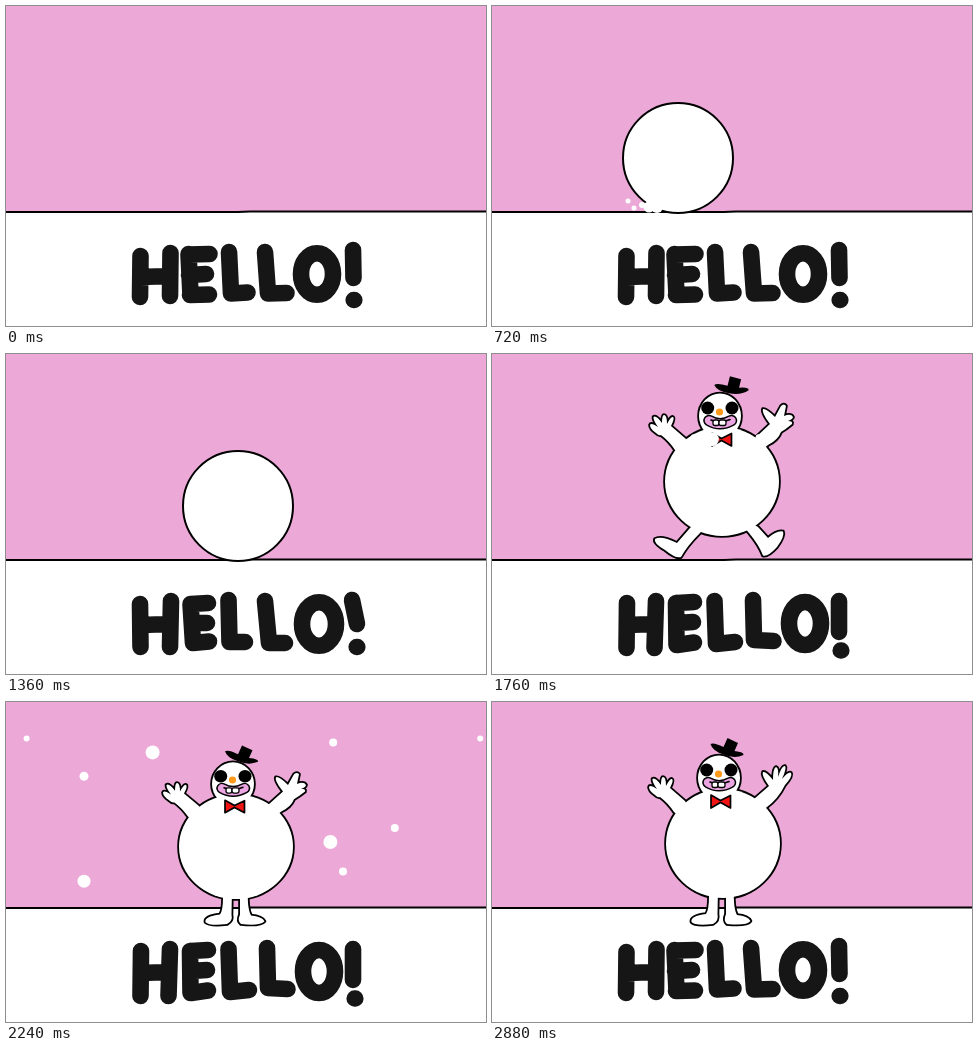
These frames come from a looping animation (480x320 px, 2.96 s). An HTML page:

```html
<!DOCTYPE html>
<html lang="en">
<head>
<meta charset="utf-8">
<title>Hello snowman</title>
<style>
  html, body { margin: 0; width: 100%; height: 100%; overflow: hidden; background: #fff; }
  svg { display: block; width: 480px; height: 320px; }
  .line { fill: none; stroke: #000; stroke-width: 2; }
  #letters { fill: none; stroke: #161616; stroke-width: 16.6; stroke-linecap: round; stroke-linejoin: round; }
</style>
</head>
<body>
<svg viewBox="0 0 480 320" role="img" aria-label="HELLO!">
  <defs>
    <g id="figure">
      <path d="M200 112L193 99L178 86Q182 78 180 77Q178 76 174 84Q174 75 171 75Q169 75 169 83Q163 75 160.5 77Q160 80 165 87Q158 82 157 85Q157 89 163 93Q166 96 168 95Q176 101 182 110L200 125Z"/>
      <path id="armRight"/>
      <path id="legLeft"/>
      <path id="legRight"/>
      <ellipse id="body" cy="141.5" rx="57" ry="54.5"/>
      <ellipse cx="227" cy="76" rx="21" ry="22.5"/>
    </g>
  </defs>
  <rect width="480" height="206" fill="#eca8d7"/>
  <path d="M0 206H232L244 205.3H480V320H0Z" fill="#fff"/>
  <path class="line" d="M0 206H232L244 205.4H480"/>
  <path id="letters"/>
  <g id="ball">
    <circle cy="152" r="55" fill="#fff" stroke="#000" stroke-width="2"/>
    <g id="spray" fill="#fff"></g>
  </g>
  <g id="snowman">
    <use href="#figure" stroke="#000" stroke-width="3.6" stroke-linejoin="round"/>
    <use href="#figure" fill="#fff"/>
    <circle cx="214.7" cy="68" r="6.5"/>
    <circle cx="239" cy="68" r="6.5"/>
    <circle cx="226.5" cy="72" r="3.6" fill="#ff9a1a"/>
    <g fill="none" stroke-linecap="round">
      <path d="M216 80.5Q227 87 238.5 80.5" stroke="#000" stroke-width="11.5"/>
      <path d="M216 80.5Q227 87 238.5 80.5" stroke="#eba6e2" stroke-width="8.5"/>
      <path d="M218 80Q227 84 237 79.5" stroke="#000" stroke-width="1.6"/>
    </g>
    <g fill="#fff" stroke="#000" stroke-width="1.3">
      <rect x="220" y="80" width="6" height="5.5" rx="2"/>
      <rect x="226" y="80" width="7" height="5.5" rx="2"/>
    </g>
    <path d="M219 93L228.5 98.5L238.5 93.5V106L228.5 100.5L219 106Z" fill="#f01414" stroke="#000" stroke-width="1.7" stroke-linejoin="round"/>
    <path id="hat" d="M219 42Q222 40 232 45L236 36L246.5 41L243 49Q253 50 252 53Q243 57 232 52.5Q221 49 219 42Z"/>
  </g>
  <g id="flakes" fill="#fff"></g>
</svg>
<script>
const STEP = 80, STEPS = 37;
const BURST = 22, LAND = 28;
const $ = id => document.getElementById(id);

// Three hand-drawn variants that alternate on every step.
const oval = (x, y, rx, ry) =>
  `M${x - rx} ${y}a${rx} ${ry} 0 1 0 ${2 * rx} 0a${rx} ${ry} 0 1 0 ${-2 * rx} 0`;
const lettering = [
  "M134.5 250L134 291M164.5 247L164 290M135 271L164 270" +
  "M182.5 248L184.5 289M183 248.5L203.5 248M183 269L200 268M184 289L203 288.5" +
  "M223 246L225 287.5L241.5 286.5M259 246L262 287.5L280.5 287" +
  oval(311, 268, 16, 20.8) + "M347 244L347.5 272M347.7 294h.6",
  "M135 249L134.5 294M164 247L162.5 294M135 271L163 270" +
  "M184 249L184.5 291M185 249L202 248M185 269L201 268M185 291L202 288.5" +
  "M222.5 247L224 290L243 288M261 246L262 286L281.5 287" +
  oval(313, 269.5, 16, 21.5) + "M347 247L347 278M348.7 296.5h.6",
  "M134 250L134.5 293M165 247L164 293M135 271L164 270" +
  "M184.5 250L187 289M185 250L202 249M186 269L201 269M187 289L203 287.5" +
  "M222.5 246L223.5 288L239 288M259 247L263 289L279 289" +
  oval(313, 270, 17, 21.8) + "M346 246L351 270M350.7 293h.6"
];
const waveOpen = "M250 110L262 97L277 84Q269 73 271 70Q274 69 281 78Q281 66 284 65Q287 66 286 75Q290 63 293 64Q295 66 290 77Q297 69 299 71Q301 74 293 83Q286 97 275 105L250 125Z";
const wavePoint = "M250 110L262 98L277 84Q268 72 270 69Q273 68 282 77L288 66Q291 63 293 66L291 76Q298 73 300 77Q300 79 295 81Q300 81 299 84Q293 89 288 92Q285 100 275 105L250 125Z";
const wave = [waveOpen, wavePoint, wavePoint];
const bodyX = [231, 230, 232];
const spray = [
  [[-50, 195, 2.5], [-44, 202, 2.5], [-36, 199, 3], [-29, 201, 5.5], [-21, 201, 6]],
  [[-52, 191, 2.5], [-45, 194, 2.5], [-48, 201, 2], [-36, 199, 5], [-28, 199, 8], [-21, 203, 4]],
  [[-51, 199, 2.5], [-46, 192, 2], [-38, 201, 4], [-28, 201, 6], [-20, 204, 3]]
];

const standing = [
  "M217 185V194Q217 208 214 212Q198 214 199.5 220Q203 224 221 222Q227 219 225.5 212L226 185Z",
  "M234 185V212Q231 219 235 222Q255 224 258.5 219Q256 214 245 213Q241 206 242 185Z"
];
const leaping = [
  "M207 178L197 188L184 203Q168 195 162 199Q160 203 172 210Q183 219 188 217Q194 206 207 193L217 180Z",
  "M250 178L265 187L275 198Q284 190 290 191.5Q292 196 284 207Q275 217 270 215.5Q266 205 256 193L245 180Z"
];

const rollKeys = [[0, -60], [1, -25], [4, 55], [9, 186], [11, 228], [12, 232]];
const jump = [-14, -38, -52, -50, -36, -14];
const hatLift = [0, -1, -2, -4, -3, -2];

// Each flake: its place five steps after the burst, and its radius.
const FLIGHT = 5, GRAVITY = 14;
const flakes = [
  [122, 23, 4.5], [171, 6, 7], [122, 98, 6.5], [174, 118, 4], [298, 70, 7], [307, 91, 4],
  [300, 126, 4], [344, 60, 4], [300, -1, 4], [81, -4, 3], [405, -4, 3]
];

const dots = list => list.map(([x, y, r]) => `<circle cx="${x}" cy="${y}" r="${r}"/>`).join("");
const show = (id, on) => $(id).setAttribute("visibility", on ? "visible" : "hidden");
const set = (id, name, value) => $(id).setAttribute(name, value);

function along(keys, t) {
  const i = keys.findIndex(k => k[0] >= t);
  if (i < 0) return keys[keys.length - 1][1];
  if (i === 0) return keys[0][1];
  const [t0, a] = keys[i - 1], [t1, b] = keys[i];
  return a + (b - a) * (t - t0) / (t1 - t0);
}

function flakeAt([x, y, r], t) {
  const vx = (x - 232) / FLIGHT;
  const vy = (y - 140) / FLIGHT - GRAVITY * FLIGHT / 2;
  return [232 + vx * t, 140 + vy * t + GRAVITY * t * t / 2, r];
}

function drawBall(step, pose) {
  const rolling = step > 0 && step < 12;
  set("ball", "transform", `translate(${along(rollKeys, step)})`);
  $("spray").innerHTML = rolling ? dots(spray[pose]) : "";
}

function drawSnowman(step, pose) {
  const airborne = step < LAND;
  const n = step - BURST;
  const dy = airborne ? jump[n] : 0;
  const squash = step === LAND ? .96 : 1;
  const [left, right] = airborne ? leaping : standing;
  set("snowman", "transform", `translate(${airborne ? 1 : 0} ${dy + 224 * (1 - squash)}) scale(1 ${squash})`);
  set("legLeft", "d", left);
  set("legRight", "d", right);
  set("armRight", "d", wave[pose]);
  set("body", "cx", bodyX[pose] - (airborne ? 1 : 0));
  set("hat", "transform", airborne ? `translate(3 ${hatLift[n]}) rotate(-10 236 48)` : `translate(${pose ? 0 : -.5} 0)`);
}

function draw(step) {
  const pose = step % 3, burst = step >= BURST;
  set("letters", "d", lettering[pose]);
  show("ball", !burst);
  show("snowman", burst);
  if (burst) drawSnowman(step, pose);
  else drawBall(step, pose);
  const flown = step - BURST + 1;
  const aloft = burst ? flakes.map(f => flakeAt(f, flown)).filter(f => f[1] < 200) : [];
  $("flakes").innerHTML = dots(aloft);
}

const start = performance.now();
let shown = -1;
function tick() {
  const step = Math.floor((performance.now() - start) / STEP) % STEPS;
  if (step !== shown) draw(shown = step);
  requestAnimationFrame(tick);
}
tick();
</script>
</body>
</html>
```
